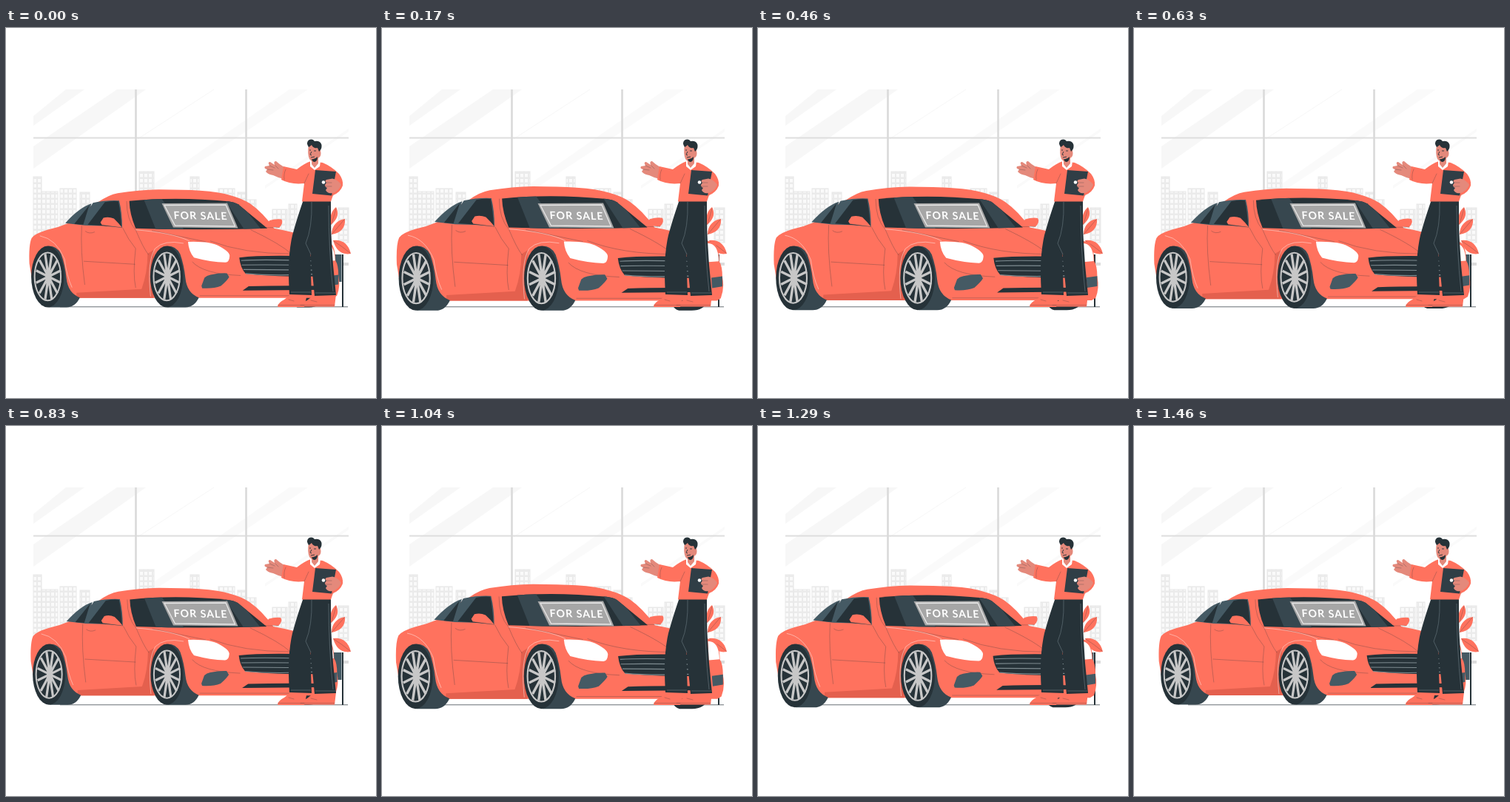
Recreate the animation shown at these times as an HTML page. Size 500 by 500 pixels, loop 1500 ms.

```html
<!DOCTYPE html>
<html lang="en">
<head>
<meta charset="utf-8">
<title>Car for sale</title>
<style>
html, body { margin: 0; width: 100%; height: 100%; overflow: hidden; background: #fff; }
svg { display: block; width: 100vw; height: 100vh; }
.red { fill: #ff725e; } .dark { fill: #263238; } .slate { fill: #455a64; } .skin { fill: #e4897b; }
.line { fill: none; stroke: #263238; stroke-width: .6; stroke-opacity: .45; stroke-linecap: round; }
.gleam { fill: none; stroke: #fff; stroke-width: .7; stroke-opacity: .6; }
</style>
</head>
<body>
<svg viewBox="0 0 500 500">
  <defs>
    <pattern id="panes" width="6" height="7" patternUnits="userSpaceOnUse">
      <rect width="6" height="7" fill="#ebebeb"/><rect x="1" y="1" width="4" height="4.5" fill="#fafafa"/>
    </pattern>
    <clipPath id="glass"><path d="M167.500 234.500Q230 228 300 235Q308 236 313 239L352 271Q260 274 176 271Q168 252 167.500 234.500Z"/></clipPath>
  </defs>

  <g id="room">
    <path fill="#f7f7f7" d="M81 83H106L37 132V119ZM150 83H189L37 190V160Z"/>
    <path fill="#fafafa" d="M383 83H408L324 140L178 236V226ZM463 136V140L350 217V213Z"/>
    <path d="M281 83L178 150" stroke="#f7f7f7"/>
    <g id="city" fill="url(#panes)" stroke="#e8e8e8"></g>
    <path d="M37 148.5H463" stroke="#dedede" stroke-width="2"/>
    <path d="M175.5 83V262M324.5 83V262" stroke="#dadada" stroke-width="2.6"/>
    <path d="M73 376.8H462" stroke="#263238" stroke-width=".7"/>
  </g>

  <g id="plant">
    <path d="M455 306V377" stroke="#263238" stroke-width="2"/>
    <path class="slate" d="M440 306H453.5V343H440Z"/>
    <path fill="#dcdcdc" d="M456 317H463V321H456Z"/>
    <path class="red" d="M439 266C437 254 440 247 446 242C450 250 449 258 439 266ZM440 279C440 267 448 259 458 258C459 269 453 277 440 279ZM442 287C453 285 463 291 466 305C454 307 446 301 442 287Z"/>
    <path class="line" d="M440 265L446 244M440 279L457 259M443 288Q454 295 465 304M440 306Q438 284 440 265"/>
  </g>

  <g id="car">
    <path class="dark" d="M378 345H428V364Q424 376.500 408 376.500H392Q380 374 378 345Z"/>
    <path class="red" d="M38 342L34 318Q33 293 37 284Q41 278 58 273Q72 270 86 264Q108 245 125 236.500Q140 226 152 224Q180 219.500 207 219Q240 219 262 220.500Q288 222 303 227Q318 231 329 238Q346 250 361 271Q388 276 410 283L436 290Q443 296 443 314Q447 320 447 334Q450 348 445 361L440 364H60Z"/>
    <path fill="#e4604e" d="M97 357L184 352Q192 330 192 305L200 300V364H97Z"/>
    <path class="slate" d="M82 264Q101 243 117 238L108 267ZM119 237Q138 233 154 234Q158 250 158 270Q133 267 108 267Q109 251 119 237Z"/>
    <path class="dark" d="M94 265L114 240L106 266ZM135 236Q146 234 153 235Q156 250 157 269L112 266Z"/>
    <g clip-path="url(#glass)">
      <path class="dark" d="M160 225H360V280H160Z"/>
      <path fill="#37474f" d="M184 225H206L246 280H206ZM290 225H306L350 280H326Z"/>
    </g>
    <path class="red" d="M129 263L133 257Q140 255 147 258L153 264L158 270L131 266.500ZM349 268.500L355 260.500Q363 258 371 259Q374 264 368 270Z"/>
    <path class="line" d="M158 270L131 266.500M350 270H368M104 268Q102 300 108 346M159 271Q166 286 176 298Q172 332 176 350M107 315L175 319M109 275Q114 279 121 276M164 235Q164 260 176 273Q186 297 193 306M198 274Q246 284 270 289M330 273Q370 292 384 305M276 288Q320 305 384 305M252 316Q266 332 316 334M262 361H382"/>
    <path class="gleam" d="M48 281Q70 285 81 312Q84 335 91 350M196 362Q191 315 202 298Q214 286 240 291M176 273Q226 277 248 288"/>
    <path fill="#fff" d="M246 289Q276 288 288 295Q303 303 301.500 309Q301 316 296 316.500Q276 316 254 310Q247 302 246 289ZM428 291Q442 291 442.500 314L429 315Z"/>
    <path class="dark" d="M314.500 310Q350 306 427 309L422 335Q360 336 323 331.500Q316 324 314.500 310Z"/>
    <path d="M317 314Q350 312 425 315M318 320Q360 319 425 321M320 326Q360 326 424 327M323 331.500Q360 335 422 332" fill="none" stroke="#7e8b90" stroke-width="1.100"/>
    <path class="slate" d="M264 348L268 337Q271 334 276 333Q288 330.500 298 331L301 336Q299 340 290 348Q280 352 265 351ZM433 335L447 333V346L434 348Z"/>
    <path class="dark" d="M319 354L327 348.500Q370 347 430 348V353Z"/>
    <g id="wheels"></g>
  </g>

  <g id="sign">
    <path fill="#a6a6a6" d="M210.500 237L299 236.500L313.500 270.500L226 269.500Z"/>
    <path fill="none" stroke="#e6e6e6" stroke-width="1.300" d="M214 239.500L297 239L309.500 268L228.500 267Z"/>
    <text transform="translate(227 258) rotate(1) skewX(6)" font-family="Lato, sans-serif" font-weight="700" font-size="14.200" letter-spacing="1" fill="#fff">FOR SALE</text>
  </g>

  <g id="seller">
    <path class="red" d="M367 376Q368 371 376 367L385 360H407L403 377H368Z"/>
    <path class="red" d="M397 376Q399 371 407 368L417 360H446L444 376.500H399Z"/>
    <path class="line" d="M368 374.500H403M398 374.500H444M382 367L389 369M412 368L420 370"/>
    <path class="dark" d="M402 232H439V273L442 320L446 361L417 362Q414 330 411 303L413 361L383 360Q381 325 383 306Q385 285 389 273Q394 255 402 232Z"/>
    <path d="M413 235Q414 270 405 291L412 306M385 357H412M418 358H445M436 240Q436 300 442 356" fill="none" stroke="#607078" stroke-width=".7"/>
    <path class="skin" d="M376 188Q369 184 365 180Q361 180 363 185L357 181Q353 181 356 186L350 187Q348 190 353 191L351 194Q354 198 361 199Q367 202 375 204Z"/>
    <path class="line" d="M356 186L363 189M353 191L361 192M364 186L368 190"/>
    <path class="red" d="M375 187L393 191Q403 183 412 180L428 182Q440 187 450 197Q456 205 455 213Q452 222 442 226L439 234.500H400L403 210Q385 212 372 205Z"/>
    <path class="line" d="M403 210L409 197M378 191Q375 197 376 205M442 226L436 222"/>
    <path fill="#fff" d="M411 179L425 180L424 187L417 192L411 187Z"/>
    <path class="skin" d="M409 158Q407 170 410 177L413 180V184L417 189L422 183V176Q427 173 425 166L423 158Z"/>
    <path class="dark" d="M409 161Q405 155 409 151.500Q414 149 417 153Q425 152 426.500 158Q427 164 423 167L421 162Q415 163 413 158Q411 160 409 161Z"/>
    <path class="dark" d="M413 177Q417 178 421 174Q421 180 417 181Q414 181 413 177Z"/>
    <path d="M410 165H412M416 166H419M413 167L411 171L413 172M412 175L417 174" fill="none" stroke="#263238" stroke-width=".9"/>
    <path fill="#303e46" d="M418 192L446 194L440 226.500L414 224Z"/>
    <circle cx="429" cy="208.500" r="2.300" fill="#fff"/>
    <path class="skin" d="M453 212Q449 205 441 203.500L433 205Q430 207 433 209L431 212Q431 215 434 216L432 219Q434 224 441 223Q449 221 453 212Z"/>
    <path class="line" d="M433 209L440 209M432 214L440 214"/>
  </g>
</svg>
<script>
const byId = id => document.getElementById(id);

// x, top, width of each building
const buildings = [[37, 201, 11], [48, 221, 22], [73, 217, 22], [100, 222, 13], [180, 194, 20], [249, 201, 12],
  [287, 217, 22], [313, 222, 12], [325, 232, 13], [360, 245, 20], [382, 238, 11], [449, 243, 14]];
byId('city').innerHTML = buildings.map(([x, y, w]) =>
  `<rect x="${x}" y="${y}" width="${w}" height="${290 - y}"/>`).join('');

function wheel(x, y) {
  let spokes = '';
  for (let i = 0; i < 12; i++) {
    const a = (i + .5) * Math.PI / 6;
    spokes += `M0 0L${17 * Math.cos(a)} ${31.5 * Math.sin(a)}`;
  }
  return `<g transform="translate(${x} ${y})">
    <path fill="#37474f" d="M0 -41Q12 -41 17 -30Q22 -16 24 2Q26 22 42 28Q36 41 24 41H0Z"/>
    <ellipse class="dark" cx="-1" rx="22" ry="41"/>
    <ellipse class="dark" cx="-1" rx="17.5" ry="32" stroke="#c7c7c7" stroke-width="2"/>
    <path d="${spokes}" stroke="#c7c7c7" stroke-width="3.2"/>
    <ellipse rx="4" ry="7" fill="#c7c7c7"/></g>`;
}
byId('wheels').innerHTML = wheel(59.5, 335.5) + wheel(218.5, 335.5);

// Heartbeat: time in ms, amount of swelling
const beat = [[0, .11], [280, 1], [460, .58], [825, 0], [1135, 1], [1290, .46], [1455, 0], [1500, .11]];

function swell(t) {
  const i = beat.findIndex(key => key[0] > t);
  const [t0, a] = beat[i - 1], [t1, b] = beat[i];
  return a + (b - a) * (t - t0) / (t1 - t0);
}

function draw() {
  const scale = 1 + .1 * swell(performance.now() % 1500);
  byId('car').setAttribute('transform', `translate(249 295) scale(${scale}) translate(-249 -295)`);
  requestAnimationFrame(draw);
}
draw();
</script>
</body>
</html>
```
